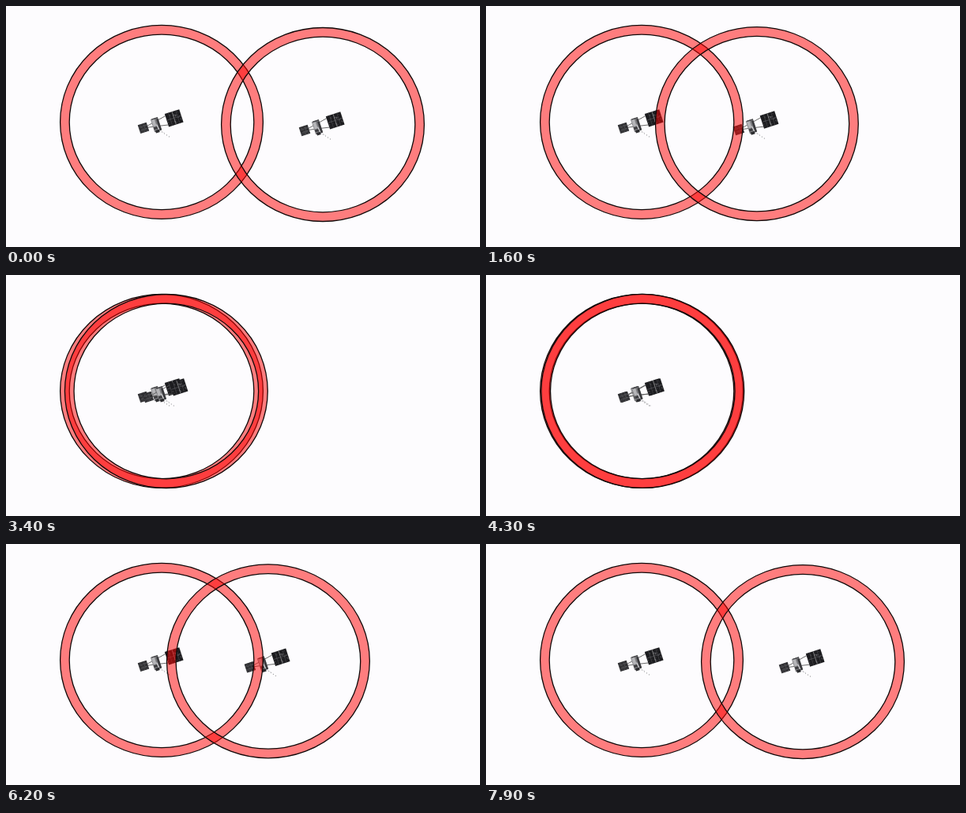
Animation, 600 px wide and 306 px high, one loop 8.4 s. Source, as an HTML page with a canvas:

```html
<!DOCTYPE html>
<html lang="en">
<head>
<meta charset="utf-8">
<title>Two satellites</title>
<style>
  html, body { margin: 0; width: 100%; height: 100%; overflow: hidden; background: #fdfcfe; }
  canvas { display: block; }
</style>
</head>
<body>
<canvas id="stage" width="600" height="306"></canvas>
<script>
const ctx = document.getElementById('stage').getContext('2d');
const LOOP = 8400, STEP = 100, LAST = 7900, TURN = 3960;
const HOME = { x: 197, y: 147.4 }, REACH = 204;
const TILT = -0.314;

// Distance covered (0..1): speed ramps up, stays constant, ramps down.
function travel(t) {
  const speed = 0.5, ramp = 1.55, middle = 2.046;
  const half = (1 / speed + ramp) / 2;
  const left = Math.max(0, half - Math.abs(t - middle));
  const part = left < ramp ? speed * left ** 2 / (2 * ramp) : speed * (left - ramp / 2);
  return t < middle ? part : 1 - part;
}

function seeded(seed) {
  return () => (seed = (seed * 16807) % 2147483647) / 2147483647;
}

// Rectangle around a centre point.
function box(x, y, w, h, fill) {
  ctx.fillStyle = fill;
  ctx.fillRect(x - w / 2, y - h / 2, w, h);
}

function line(x1, y1, x2, y2, color, width = 0.8) {
  ctx.beginPath();
  ctx.moveTo(x1, y1);
  ctx.lineTo(x2, y2);
  ctx.strokeStyle = color;
  ctx.lineWidth = width;
  ctx.stroke();
}

// Solar panel with mottled cells and a fine grid.
function panel(x, w, h, cols, rows, fill) {
  const rand = seeded(cols * 97 + 5);
  const x0 = x - w / 2, y0 = -h / 2;
  box(x, 0, w, h, fill);
  for (let i = 0; i < w * h / 8; i++)
    box(x0 + 1 + rand() * (w - 2), y0 + 1 + rand() * (h - 2), 1.5, 1.2, `rgba(150, 150, 155, ${rand() * 0.4})`);
  for (let i = 1; i < cols; i++)
    line(x0 + w * i / cols, y0, x0 + w * i / cols, -y0, i * 2 === cols ? '#aaa' : '#48484b', 0.6);
  for (let j = 1; j < rows; j++)
    line(x0, y0 + h * j / rows, x0 + w, y0 + h * j / rows, '#5c5c60', 0.6);
}

// Panels and body sit along one tilted axis.
function satellite(x, y) {
  ctx.save();
  ctx.translate(x, y);
  for (let i = 0; i < 4; i++) box(0.5 + i * 3, 12.5 + i * 2, 1, 1, '#88888b');
  line(-3, 10.5, 4, 14, '#d0d0d3', 0.6);

  ctx.rotate(TILT);
  for (const side of [-1, 1]) {
    line(-8, side * 3, 7, side * 6, '#555');
    line(-8, side * 3, -19, side, '#555');
  }
  panel(-24.2, 11.5, 11.5, 3, 3, '#2c2c2f');
  panel(16.5, 19.4, 17.2, 4, 2, '#1c1c1f');

  box(-7.6, 1, 9.5, 17, '#7d7d80');
  box(-9.6, -2, 4, 9, '#b5b5b8');
  box(-4.2, 2, 2.6, 15, '#39393c');
  box(-9.5, 5, 4.6, 3, '#3d3d40');
  box(-7, -7, 8, 1.4, '#444447');
  box(-8.5, 9.5, 5, 3.5, '#2c2c2f');
  line(-7, 1, -6, 8, '#dedee0', 1);
  ctx.restore();
}

function ring(x, y) {
  const oval = (rx, ry) => ctx.ellipse(x, y, rx, ry, 0, 0, Math.PI * 2);
  ctx.beginPath();
  oval(128.4, 123);
  ctx.closePath();
  ctx.moveTo(x + 116.8, y);
  oval(116.8, 111.3);
  ctx.fillStyle = 'rgba(255, 0, 0, 0.5)';
  ctx.fill('evenodd');
  ctx.strokeStyle = '#100808';
  ctx.lineWidth = 1.3;
  ctx.stroke();
}

function draw(time) {
  const t = Math.min(Math.floor((time % LOOP) / STEP) * STEP, LAST);
  const back = t > TURN;
  const away = 1 - travel((back ? 2 * TURN - t : t) / 1000);
  const x = HOME.x + REACH * away;
  const y = HOME.y + (back ? 2.2 : 3.1) * away;

  ctx.fillStyle = '#fdfcfe';
  ctx.fillRect(0, 0, 600, 306);
  satellite(HOME.x, HOME.y);
  satellite(x, y);
  ring(HOME.x, HOME.y);
  ring(x, y);
}

const begin = performance.now();
function tick() {
  draw(performance.now() - begin);
  requestAnimationFrame(tick);
}
tick();
</script>
</body>
</html>
```
